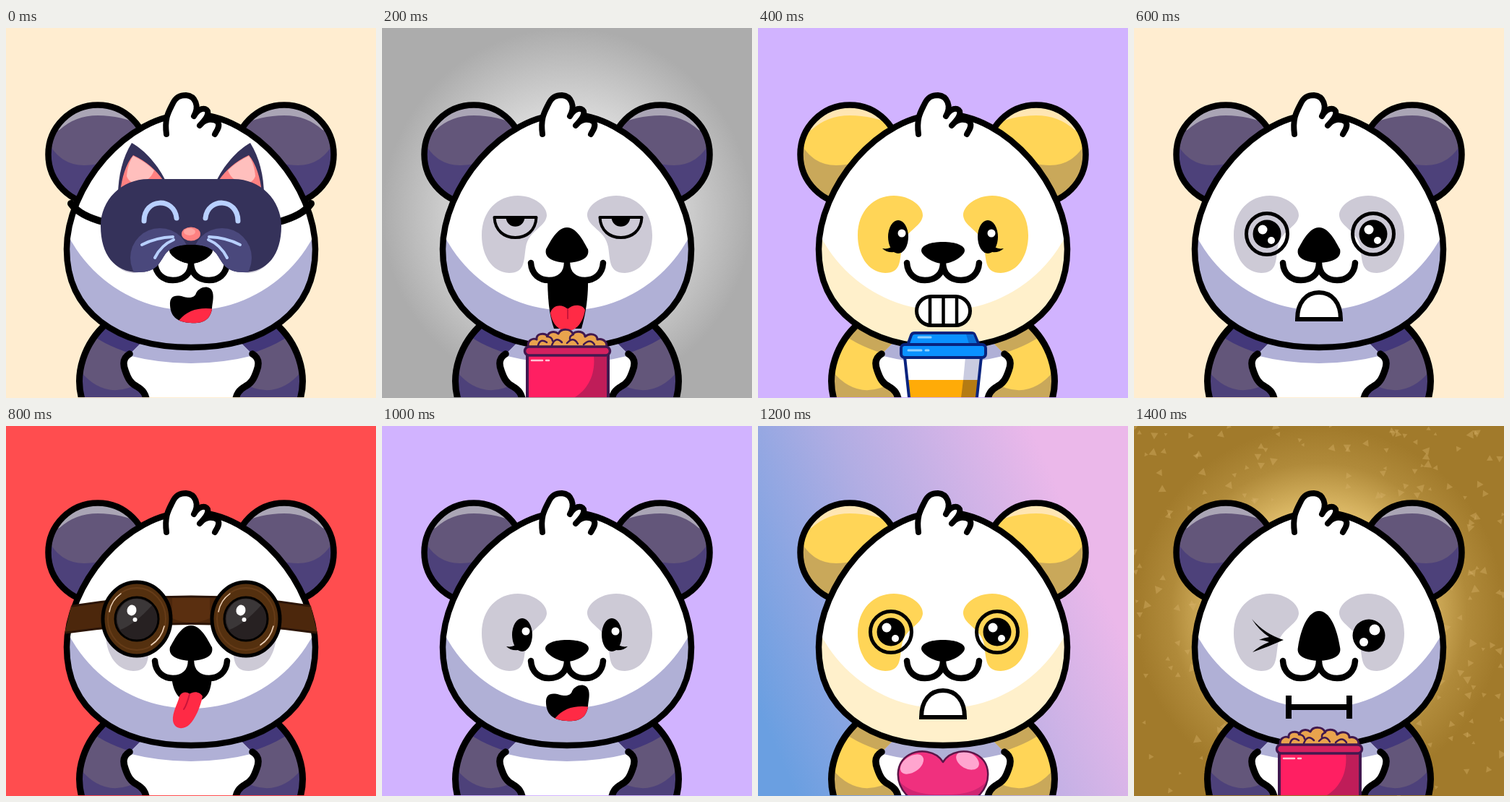
Recreate the animation shown at these times as an HTML page with a canvas. Size 512 by 512 pixels, loop 1.6 s.

```html
<!DOCTYPE html>
<html lang="en">
<head>
<meta charset="utf-8">
<title>Panda outfits</title>
<style>
html, body { margin: 0; width: 100%; height: 100%; overflow: hidden; }
canvas { display: block; width: 100vw; height: 100vh; }
</style>
</head>
<body>
<canvas id="stage" width="512" height="512"></canvas>
<script>
const ctx = document.getElementById('stage').getContext('2d');
const INK = '#000', WHITE = '#fff', RED = '#ff2a45', LILAC = '#b0b0d6';
const STEP = 200, LINE = 8.5;

const furs = {
  dark: { base: '#4d417a', light: '#63567a', shine: '#aaa5b5', armTop: '#43387a', patch: '#cdcad6', shade: LILAC },
  gold: { base: '#c9a85a', light: '#ffd557', shine: '#ffe6b3', armTop: '#c9a85a', patch: '#ffd557', shade: '#fff0cb' }
};

function shape(d, fill, stroke, width = LINE) {
  const path = d instanceof Path2D ? d : new Path2D(d);
  if (fill) { ctx.fillStyle = fill; ctx.fill(path); }
  if (stroke) { ctx.strokeStyle = stroke; ctx.lineWidth = width; ctx.stroke(path); }
}

function oval(x, y, rx, ry, fill, stroke, width, turn = 0) {
  const path = new Path2D();
  path.ellipse(x, y, rx, ry, turn, 0, Math.PI * 2);
  shape(path, fill, stroke, width);
}

const dot = (x, y, r, fill, stroke, width) => oval(x, y, r, r, fill, stroke, width);

function box(x, y, w, h, r, fill, stroke, width) {
  const path = new Path2D();
  path.roundRect(x, y, w, h, r);
  shape(path, fill, stroke, width);
}

function both(draw) {
  draw();
  ctx.save();
  ctx.translate(512, 0);
  ctx.scale(-1, 1);
  draw();
  ctx.restore();
}

function clipped(d, draw) {
  ctx.save();
  ctx.clip(d instanceof Path2D ? d : new Path2D(d));
  draw();
  ctx.restore();
}

function seeded(seed) {
  return () => (seed = (seed * 16807) % 2147483647) / 2147483647;
}

function gradient(g, ...stops) {
  stops.forEach(([at, color]) => g.addColorStop(at, color));
  return g;
}

function fillAll(style) {
  ctx.fillStyle = style;
  ctx.fillRect(0, 0, 512, 512);
}

const glow = (...stops) => fillAll(gradient(ctx.createRadialGradient(256, 256, 0, 256, 256, 256), ...stops));

const backs = {
  cream: () => fillAll('#ffedd0'),
  violet: () => fillAll('#d1b3ff'),
  coral: () => fillAll('#ff4d4f'),
  grey: () => glow([0, '#f0f0f0'], [0.5, '#dcdcdc'], [1, '#acacac']),
  sky: () => fillAll(gradient(ctx.createLinearGradient(0, 390, 460, 190),
    [0, '#6a9fe1'], [0.5, '#b1ade3'], [1, '#ebb8ea'])),
  sparkle: () => {
    glow([0, '#ffe9a8'], [0.55, '#dcb966'], [0.8, '#b08a3a'], [1, '#a17a2b']);
    const rnd = seeded(71);
    ctx.fillStyle = 'rgba(214,178,104,.4)';
    for (let i = 0; i < 330; i++) {
      const x = rnd() * 512, y = rnd() * 512, r = 2.5 + rnd() * 4.5, a = rnd() * 6.28;
      ctx.beginPath();
      for (let k = 0; k < 3; k++) ctx.lineTo(x + r * Math.cos(a + k * 2.09), y + r * Math.sin(a + k * 2.09));
      ctx.fill();
    }
  }
};

const HEAD = new Path2D('M256 119C165 119 84 222 84 306C84 392 152 442 256 442C360 442 428 392 428 306C428 222 347 119 256 119Z');
const EAR = new Path2D('M58.5 175a68.5 68.5 0 1 1 137 0a68.5 68.5 0 1 1-137 0Z');
const HAND = 'C194 505 188 500 181 496C173 492 169 486 165 474C162 466 161 457 171 451';
const ARM = new Path2D('M140 408C110 434 92 478 107 520H195' + HAND + 'L186 436Z');

function ear(fur) {
  shape(EAR, fur.base);
  clipped(EAR, () => {
    shape('M50 95H200V130C175 175 140 190 108 190C85 190 68 178 56 154Z', fur.light);
    shape('M50 95H205L188 135Q160 121 127 121Q96 121 74 141L50 150Z', fur.shine);
  });
  shape(EAR, null, INK);
}

function arm(fur) {
  shape(ARM, fur.base);
  clipped(ARM, () => {
    shape('M90 410H190V488Q140 520 102 474Z', fur.light);
    shape('M105 400H200V458Q150 446 122 427Z', fur.armTop);
  });
  shape('M140 408C110 434 92 478 107 520', null, INK, 9);
  shape('M195 520' + HAND, null, INK, 9.5);
}

function body(fur) {
  shape('M180 430H332L346 452V480L318 520H194L166 480V452Z', WHITE);
  shape('M180 430H332L343 453Q256 475 169 453Z', LILAC);
  both(() => arm(fur));
}

function head(fur) {
  both(() => ear(fur));
  shape(HEAD, WHITE);
  clipped(HEAD, () => shape('M65 200A191 191 0 0 0 447 200V450H65Z', fur.shade));
  shape(HEAD, null, INK);
  const tuft = 'M222 147C219 125 225 116 230 106C235 95 241 93 249 93C262 94 268 108 260 122C266 111 276 109 279 115C281 122 274 129 268 135C276 125 287 125 293 130C297 136 291 143 289 147';
  shape(tuft, WHITE);
  shape(tuft, null, INK, 8);
  both(() => shape('M188 232C211 232 229 247 228 260C226 276 203 280 199 303C196 322 198 339 176 339C151 338 138 313 138 287C138 253 160 232 188 232Z', fur.patch));
}

function muzzle(top) {
  const flat = top > 290;
  const side = flat ? 304 : top + 24;
  shape('M206 325C207 341 218 349 231 349C246 349 256 340 256 325C256 340 266 349 281 349C294 349 305 341 306 325', null, INK);
  shape(flat
    ? 'M256 296C274 296 286 301 286 308C286 315 269 326 256 326C243 326 226 315 226 308C226 301 238 296 256 296Z'
    : `M256 ${top}C271 ${top} 281 ${side} 285 306C288 319 274 324 256 325C238 324 224 319 227 306C231 ${side} 241 ${top} 256 ${top}Z`, INK);
}

// The open mouth hangs from the muzzle line, so the cheeks are filled above it.
function openMouth(d) {
  shape(d, INK);
  shape('M208 325C209 340 219 346 231 346C246 346 256 338 256 325C256 338 266 346 281 346C293 346 303 340 304 325Z', WHITE);
}

const mouths = {
  laugh: () => {
    const d = new Path2D('M227 384C226 370 235 369 246 372C257 375 262 371 263 367C268 357 283 355 286 366C288 374 285 382 285 389C282 407 268 409 255 408C239 407 228 401 227 384Z');
    shape(d, INK);
    clipped(d, () => shape('M239 405C252 389 269 386 290 389V415H239Z', RED));
  },
  gape: () => {
    openMouth('M229 340H285C286 372 282 395 276 416H238C231 397 229 372 229 340Z');
    shape('M233 394C237 382 250 382 257 389C264 382 277 382 281 390C279 404 271 419 257 419C243 419 235 408 233 394Z', RED);
    shape('M257 389V402', null, '#c9143a', 2);
  },
  teeth: () => {
    box(219.5, 371.5, 74, 40, 20, WHITE, INK, 5);
    shape('M238 372V411M256.5 372V411M275 372V411', null, INK, 4.5);
  },
  tongue: () => {
    openMouth('M229 340H285C285 365 280 381 258 382C239 382 229 367 229 340Z');
    shape('M240 374C243 368 250 367 254 371C260 366 269 368 272 374C269 389 262 405 254 413C246 421 233 420 231 408C230 396 237 386 240 374Z', RED);
    shape('M254 371C252 379 250 386 246 392', null, '#c9143a', 2);
  },
  dome: () => {
    ctx.lineJoin = 'miter';
    shape('M226 403C226 380 238 366 256 366C274 366 286 380 286 403Z', WHITE, INK, 6);
    ctx.lineJoin = 'round';
  },
  bar: () => {
    ctx.fillStyle = INK;
    ctx.fillRect(210, 373, 8, 32);
    ctx.fillRect(294, 373, 8, 32);
    ctx.fillRect(214, 385, 84, 8);
  }
};

const eyes = {
  bored: () => [184.5, 330.5].forEach(x => {
    shape(`M${x - 29} 262H${x + 29}C${x + 28} 281 ${x + 15} 290 ${x} 290C${x - 15} 290 ${x - 28} 281 ${x - 29} 262Z`, null, INK, 4);
    shape(`M${x - 13} 262H${x + 13}C${x + 12} 279 ${x - 12} 279 ${x - 13} 262Z`, INK);
  }),
  lashes: () => {
    both(() => {
      oval(194, 289, 14, 23, INK);
      shape('M172 305Q182 307 188 300L194 309Q180 313 172 305Z', INK);
    });
    [199, 323].forEach(x => dot(x, 284, 5.5, WHITE));
  },
  rings: () => [184, 331].forEach(x => {
    dot(x, 285, 28.5, null, INK, 5);
    dot(x, 285, 19.5, INK);
    dot(x - 6, 279, 6.5, WHITE);
    dot(x + 6, 294, 5, WHITE);
  }),
  wink: () => {
    shape('M163 267Q181 288 207 296Q187 305 164 313Q174 304 187 299Q179 296 173 296Q180 293 187 292Q173 283 163 267Z', INK);
    dot(325, 290, 22.5, INK);
    dot(333, 282, 7.5, WHITE);
    dot(318, 299, 6, WHITE);
  },
  goggles: () => {
    const dark = '#2c1507';
    shape('M90 249Q256 223 422 249L431 287Q256 262 81 287Z', '#4c270c');
    shape('M230 238Q256 235 282 238V266Q256 278 230 266Z', '#5a2f10');
    shape('M92 249Q256 223 420 249M83 286Q256 261 429 286', null, dark, 3);
    [181, 332].forEach(x => {
      oval(x, 267, 47, 51, '#54300f', INK, 5);
      oval(x, 267, 40, 43, null, '#663c18', 2);
      dot(x, 267, 30, '#272122', INK, 3);
      shape(`M${x - 23} 282Q${x - 34} 262 ${x - 17} 245Q${x + 2} 232 ${x + 21} 248Q${x - 2} 274 ${x - 23} 282Z`, '#3b3738');
      shape(`M${x - 38} 257Q${x - 35} 241 ${x - 22} 232M${x + 38} 277Q${x + 34} 294 ${x + 20} 303`, null, '#f2d8bf', 1.5);
      oval(x - 7, 255, 6.5, 7.5, WHITE, null, 0, 0.2);
      dot(x - 2.5, 268, 3, WHITE);
    });
  },
  mask: () => {
    const navy = '#35325a', blue = '#b8d0ff', pink = '#ff8181', blush = '#ffbfbd';
    both(() => {
      shape('M90 243C98 255 114 263 137 269', null, INK, 10);
      shape('M155 232C155 204 162 178 174 159C192 169 211 190 222 214Z', navy);
      shape('M158 228C160 207 166 188 176 176C195 185 208 197 217 210Q185 212 158 228Z', pink);
      shape('M167 205C168 193 171 184 176 177Q193 185 205 197C198 217 172 221 167 205Z', blush);
    });
    const mask = new Path2D('M197 209H315C352 209 381 238 381 274C381 313 362 338 329 338C303 338 300 325 291 312C282 302 270 300 256 300C242 300 230 302 221 312C212 325 209 338 183 338C150 338 131 313 131 274C131 238 160 209 197 209Z');
    shape(mask, navy);
    clipped(mask, () => both(() => oval(213, 318, 41, 41, '#4a487c')));
    both(() => {
      shape('M191 267C191 235 233 234 236 263', null, blue, 7);
      shape('M188 300Q207 290 231 289M206 318Q215 300 232 293', null, blue, 4);
    });
    oval(256, 285, 13, 9.5, pink);
    oval(254, 282, 8, 5, '#ffa5a1');
  }
};

const items = {
  bucket: () => {
    const edge = '#41194f';
    const corn = 'M204 444C198 434 208 428 214 431C213 423 224 421 229 426C231 420 239 419 244 423C248 415 261 416 264 423C270 418 280 420 281 427C288 421 298 424 298 431C307 429 314 436 309 444Z';
    shape(corn, '#e9a34d', edge, 3);
    shape('M216 439Q219 429 228 435M235 439Q240 426 249 435M256 436Q265 426 271 437M279 438Q288 429 294 438M228 427Q235 427 236 433M265 424Q259 426 260 431', null, edge, 2.5);
    shape('M201 450H313V516H201Z', '#ff1f62', edge, 4);
    shape('M293 453H311V512H265C283 502 296 482 293 453Z', '#bf1d59');
    box(197.5, 441, 118, 12, 6, '#d3215f', edge, 3.5);
    shape('M207 460H222M227 460H231', null, '#ffc3d5', 2.5);
  },
  cup: () => {
    const edge = '#08237e';
    const cup = new Path2D('M203 455H309L302 520H210Z');
    shape(cup, WHITE);
    clipped(cup, () => {
      ctx.fillStyle = '#ffab08';
      ctx.fillRect(200, 487, 110, 30);
      shape('M287 455H310V487H284Z', '#c9cbe0');
      shape('M284 487H310V520H280Z', '#b57b13');
    });
    shape(cup, null, edge, 4);
    shape('M207 439L212 425Q213 422 217 422H295Q299 422 300 425L306 439Z', '#0a91ff', edge, 4);
    shape('M288 424H298L303 437H292Z', '#0a6fd6');
    box(198, 438, 117, 18, 5, '#0a91ff', edge, 4);
    shape('M222 428H239M208 446H226M232 446H236', null, '#8fd0ff', 3);
  },
  heart: () => {
    const heart = new Path2D('M256 465C246 449 224 447 209 455C190 466 189 492 205 510L225 530H287L307 510C323 492 322 466 303 455C288 447 266 449 256 465Z');
    shape(heart, '#f0307e');
    clipped(heart, () => {
      shape('M190 484C202 505 226 511 256 510C286 511 310 505 322 484V520H190Z', '#cf2572');
      oval(213, 468, 18, 11, '#ffa5cf', null, 0, -0.6);
      oval(290, 463, 17, 11, '#ffa5cf', null, 0, 0.5);
    });
    shape(heart, null, '#5a1648', 2.5);
  }
};

const looks = [
  { back: 'cream', fur: 'dark', eyes: 'mask', nose: 296, mouth: 'laugh' },
  { back: 'grey', fur: 'dark', eyes: 'bored', nose: 276, mouth: 'gape', item: 'bucket' },
  { back: 'violet', fur: 'gold', eyes: 'lashes', nose: 296, mouth: 'teeth', item: 'cup' },
  { back: 'cream', fur: 'dark', eyes: 'rings', nose: 276, mouth: 'dome' },
  { back: 'coral', fur: 'dark', eyes: 'goggles', nose: 276, mouth: 'tongue' },
  { back: 'violet', fur: 'dark', eyes: 'lashes', nose: 296, mouth: 'laugh' },
  { back: 'sky', fur: 'gold', eyes: 'rings', nose: 296, mouth: 'dome', item: 'heart' },
  { back: 'sparkle', fur: 'dark', eyes: 'wink', nose: 256, mouth: 'bar', item: 'bucket' }
];

function panda(look) {
  const fur = furs[look.fur];
  const masked = look.eyes === 'mask';
  body(fur);
  head(fur);
  if (!masked) eyes[look.eyes]();
  mouths[look.mouth]();
  muzzle(look.nose);
  if (masked) {
    eyes.mask();
    shape('M227 310C231 302 243 300 256 300C269 300 281 302 285 310C283 317 268 326 256 326C244 326 229 317 227 310Z', INK);
  }
  if (look.item) items[look.item]();
}

function draw(look) {
  ctx.lineCap = ctx.lineJoin = 'round';
  backs[look.back]();
  // The figure stops just short of the bottom edge.
  clipped('M0 0H512V511H0Z', () => panda(look));
}

const start = performance.now();
let shown = -1;

function tick(now) {
  const index = Math.floor(Math.max(0, now - start) / STEP) % looks.length;
  if (index !== shown) draw(looks[shown = index]);
  requestAnimationFrame(tick);
}
tick(start);
</script>
</body>
</html>
```
